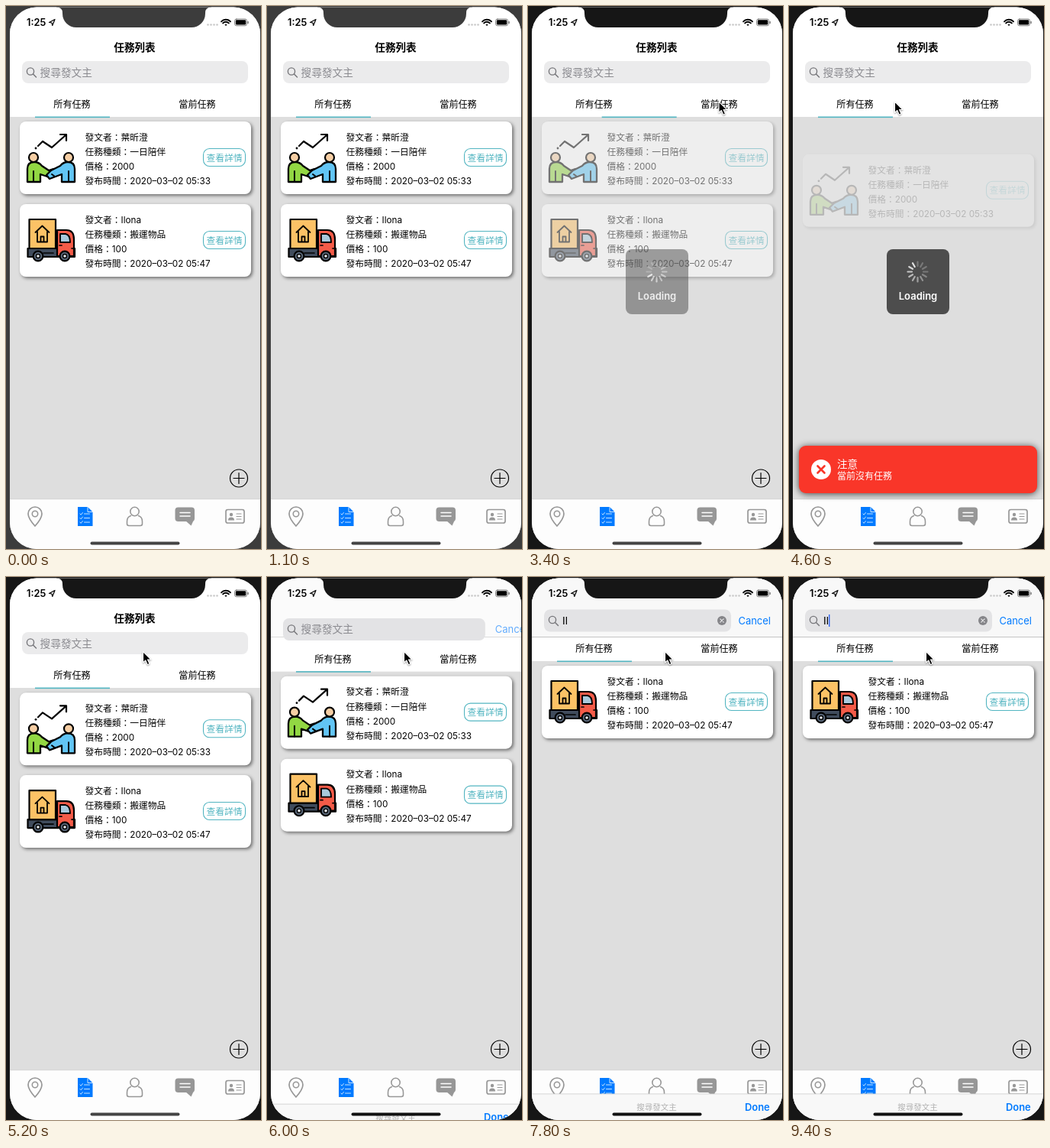
An HTML page with a canvas that plays this animation: 334 px wide and 710 px high, repeating every 9500 ms.

```html
<!DOCTYPE html>
<html lang="zh-Hant">
<head>
<meta charset="utf-8">
<title>任務列表</title>
<style>
html, body { margin: 0; width: 100%; height: 100%; overflow: hidden; background: #161616; }
canvas { display: block; width: 334px; height: 710px; }
</style>
</head>
<body>
<canvas id="stage"></canvas>
<script>
const W = 334, H = 710, LOOP = 9500;
const FAMILY = 'Inter, "Noto Sans CJK TC", "Noto Sans CJK", sans-serif';
const TEAL = '#52b5c1', BLUE = '#007aff', GRAY = '#979797', RED = '#f93629';
const dpr = window.devicePixelRatio || 1;

function prepare(canvas) {
  canvas.width = W * dpr;
  canvas.height = H * dpr;
  return canvas.getContext('2d');
}

const stage = prepare(document.getElementById('stage'));
const buffer = prepare(document.createElement('canvas'));
let ctx = stage;

const TASKS = [
  { who: '葉昕澄', kind: '一日陪伴', price: '2000', time: '05:33', icon: drawHandshake },
  { who: 'Ilona', kind: '搬運物品', price: '100', time: '05:47', icon: drawTruck }
];

// Cursor stops: time, x, y
const CURSOR = [
  [1700, 317, 89], [2000, 232, 116], [2200, 232, 118], [2600, 169, 360], [2800, 169, 360],
  [3200, 250, 125], [3900, 250, 125], [4200, 138.5, 125], [4700, 138.5, 125], [5100, 179.5, 97.5]
];

const clamp = v => Math.max(0, Math.min(1, v));
const lerp = (a, b, p) => a + (b - a) * p;
const smooth = p => p * p * (3 - 2 * p);
const ramp = (t, start, end) => smooth(clamp((t - start) / (end - start)));
const pulse = (t, a, b, c, d) => ramp(t, a, b) * (1 - ramp(t, c, d));

function text(str, x, y, size, color = '#000', weight = 400, align = 'left') {
  ctx.font = `${weight} ${size}px ${FAMILY}`;
  ctx.textAlign = align;
  ctx.fillStyle = color;
  ctx.fillText(str, x, y);
}

function rect(x, y, w, h, fill) {
  ctx.fillStyle = fill;
  ctx.fillRect(x, y, w, h);
}

function box(x, y, w, h, r, fill, stroke, width = 1) {
  ctx.beginPath();
  ctx.roundRect(x, y, w, h, r);
  paint(fill, stroke, width);
}

function circle(x, y, r, fill, stroke, width = 1) {
  ctx.beginPath();
  ctx.arc(x, y, r, 0, Math.PI * 2);
  paint(fill, stroke, width);
}

function paint(fill, stroke, width) {
  if (fill) { ctx.fillStyle = fill; ctx.fill(); }
  if (stroke) { ctx.strokeStyle = stroke; ctx.lineWidth = width; ctx.stroke(); }
}

function shape(d, fill, stroke, width = 1) {
  const path = new Path2D(d);
  if (fill) { ctx.fillStyle = fill; ctx.fill(path); }
  if (stroke) { ctx.strokeStyle = stroke; ctx.lineWidth = width; ctx.stroke(path); }
}

function resetContext(target) {
  target.setTransform(dpr, 0, 0, dpr, 0, 0);
  target.lineCap = target.lineJoin = 'round';
}

// Draws a shifted group; a translucent group is flattened before blending.
function layer(alpha, dx, dy, draw) {
  if (alpha <= 0) return;
  const flatten = alpha < 1;
  if (flatten) {
    ctx = buffer;
    resetContext(ctx);
    ctx.clearRect(0, 0, W, H);
  }
  ctx.save();
  ctx.translate(dx, dy);
  draw();
  ctx.restore();
  if (flatten) {
    ctx = stage;
    ctx.globalAlpha = alpha;
    ctx.drawImage(buffer.canvas, 0, 0, W, H);
    ctx.globalAlpha = 1;
  }
}

function shadow(color, blur, dx, dy) {
  ctx.shadowColor = color;
  ctx.shadowBlur = blur * dpr;
  ctx.shadowOffsetX = dx * dpr;
  ctx.shadowOffsetY = dy * dpr;
}

function drawHandshake() {
  circle(39, 35, 1.4, '#000');
  shape('M42 32L48 26L60 34L78 18M71 17H79V25', null, '#000', 2.2);
  shape('M28 79V62Q28 53 37 53Q43 53 47 58L56 64L62 62L65 66L57 73L45 69V79Z', '#92d743', '#000', 2.3);
  shape('M90 79V62Q90 53 81 53Q75 53 71 58L59 64L53 70L57 75L73 69V79Z', '#62c5f5', '#000', 2.3);
  shape('M36 65V79M82 65V79M60 69L64 72', null, '#000', 2);
  circle(36, 47, 6, '#f7cfa5', '#000', 2.2);
  circle(82, 47, 6, '#f7cfa5', '#000', 2.2);
}

function drawTruck() {
  shape('M28.5 58H90V69H28.5Z', '#404c5d', '#000', 2.2);
  shape('M30.5 20H65V58H30.5Z', '#fcc266', '#000', 2.2);
  shape('M67 34H79Q89 34 89 46V68H67Z', '#f45b48', '#000', 2.2);
  shape('M71 39H78Q84 40 84 50H71Z', '#a9c9dc', '#000', 1.9);
  shape('M38.5 37L47.5 28.5L56.5 37M41 36V49.5H54V36M45.5 49V42.5H49.5V49', null, '#000', 1.8);
  shape('M70 54H73M86 58H89M49 64H62', null, '#000', 1.7);
  for (const x of [42, 77]) {
    circle(x, 68, 6.4, '#596779', '#000', 2.2);
    circle(x, 68, 2.5, '#e5eaee', '#000', 1.4);
  }
}

function drawCard(task, top, alpha = 1) {
  layer(alpha, 0, top, () => {
    ctx.save();
    shadow('rgba(0,0,0,.5)', 4, 2, 2);
    box(18, 0, 303, 95, 8, '#fff');
    ctx.restore();
    task.icon();
    [
      `發文者：${task.who}`, `任務種類：${task.kind}`,
      `價格：${task.price}`, `發布時間：2020–03–02 ${task.time}`
    ].forEach((line, i) => text(line, 103.5, 24.8 + i * 19.1, 11.75));
    box(258.5, 35.5, 55, 23, 8, null, TEAL, 1.1);
    text('查看詳情', 286, 51.6, 11.8, TEAL, 400, 'center');
  });
}

// Springs into place from 50 px below its slot.
function drawEnteringCard(task, top, elapsed) {
  if (elapsed <= 0) return;
  const s = elapsed / 1000;
  const offset = 50 * Math.exp(-8 * s) * (Math.cos(10 * s) + 0.8 * Math.sin(10 * s));
  drawCard(task, top + offset, clamp(s * 3.6));
}

function drawList(t, top) {
  if (t >= 6585) {
    drawEnteringCard(TASKS[1], top, t - 6585);
  } else if (t >= 4300) {
    TASKS.forEach((task, i) => drawEnteringCard(task, top + i * 108, t - 4553 - i * 100));
  } else {
    const alpha = 1 - ramp(t, 3350, 3450);
    TASKS.forEach((task, i) => drawCard(task, top + i * 108, alpha));
  }
  circle(305, 617.5, 11.5, null, '#000', 1.2);
  shape('M298 617.5H312M305 610.5V624.5', null, '#000', 1.2);
}

function drawHeader(t, p, bottom) {
  rect(0, 0, W, bottom, '#fff');
  layer(p, 0, 0, () => {
    rect(0, 0, W, 78, '#f8f8f8');
    rect(0, 78, W, 1, '#c4c4c4');
  });
  layer(1 - clamp(p * 2), 0, -20 * p, () => text('任務列表', 168.5, 59, 13.6, '#000', 600, 'center'));

  const mid = lerp(86.5, 57, p);
  box(21, mid - 14.5, lerp(296, 245, p), 29, 8, p > 0.5 ? '#e3e3e5' : '#ebebec');
  circle(32, mid - 1, 4.6, null, '#77777b', 1.4);
  shape(`M35.5 ${mid + 2.5}L39.5 ${mid + 6.5}`, null, '#77777b', 1.5);

  const typed = t < 6550 ? '' : TASKS[1].who.slice(0, t < 7300 ? 1 : 2);
  if (typed) {
    text(typed, 45, mid + 5, 13.7);
    circle(254, mid, 6, '#858589');
    shape(`M251.8 ${mid - 2.2}l4.4 4.4m0 -4.4l-4.4 4.4`, null, '#e9e9eb', 1.2);
  } else {
    text('搜尋發文主', 44.5, mid + 5, 13.7, '#8b8b90');
  }
  const blink = (t % 1000) >= 200 && (t % 1000) < 700;
  if (t > 5950 && (blink || (t > 6550 && t < 7000))) {
    ctx.font = `400 13.7px ${FAMILY}`;
    rect(45 + ctx.measureText(typed).width, mid - 8, 1.5, 16, '#3a6cf0');
  }
  layer(p, 60 * (1 - p), 0, () => text('Cancel', 275.5, mid + 4.8, 12.9, BLUE));

  const tabY = lerp(133.3, 98.3, p);
  text('所有任務', 86.5, tabY, 12.1, '#000', 500, 'center');
  text('當前任務', 250.5, tabY, 12.1, '#000', 500, 'center');
  const slide = pulse(t, 3300, 3550, 4250, 4500);
  rect(38 + 164 * slide, bottom - 0.5, 98, 1.6, TEAL);
}

function drawStatus(shell) {
  shape('M66 0V1.5Q74 1.5 74 9V10A18 18 0 0 0 92 28H243A18 18 0 0 0 261 10V9Q261 1.5 269 1.5V0Z', shell);
  text('1:25', 27, 26, 12.8, '#000', 600);
  shape('M56.5 21.5L64 17.5L60.8 25.5L60 22Z', null, '#000', 1.2);
  for (let i = 0; i < 4; i++) circle(264.5 + i * 4, 24.5, 1.3, '#c8c8c8');
  for (const r of [2.2, 5.2, 8.2]) {
    ctx.beginPath();
    ctx.arc(288, 26, r, -Math.PI * 0.76, -Math.PI * 0.24);
    if (r < 3) { ctx.lineTo(288, 26); paint('#000'); }
    else paint(null, '#000', 1.9);
  }
  box(299.5, 17, 16, 8.8, 2.4, null, '#777', 0.9);
  box(300.8, 18.3, 13.4, 6.2, 1.3, '#000');
  rect(316.5, 20, 1.3, 3, '#777');
}

function drawTabBar() {
  rect(0, 645, W, 65, '#fdfdfd');
  rect(0, 644.5, W, 0.7, '#cfcfcf');

  shape('M38 680Q29 670 29 664A9 9 0 0 1 47 664Q47 670 38 680Z', null, GRAY, 1.7);
  circle(38, 664, 3.7, null, GRAY, 1.6);

  shape('M94 655H107L113.5 661.5V680H94Z', BLUE);
  shape('M107 655V661.5H113.5', null, '#fff', 0.8);
  for (const y of [664, 669.5, 675]) {
    shape(`M97 ${y}l1.2 1.3l2.2 -2.8M102.5 ${y}H109.5`, null, '#fff', 0.8);
  }

  circle(168.5, 661, 5.7, null, GRAY, 1.6);
  shape('M163.5 666.5Q158.5 668 158.5 674V677Q158.5 679.5 161 679.5H176Q178.5 679.5 178.5 677V674Q178.5 668 173.5 666.5', null, GRAY, 1.6);

  box(221.5, 655.5, 25.5, 18.5, 4, GRAY);
  shape('M235 673H245.5L242.5 679.5Z', GRAY);
  shape('M228 662.5H241M228 667H241', null, '#fff', 1.5);

  box(288, 658.5, 24, 17.5, 2.5, null, GRAY, 1.7);
  circle(295, 665, 2.2, GRAY);
  shape('M291 672.5Q291 668.5 295 668.5T299 672.5Z', GRAY);
  shape('M302 664H308M302 667.5H308M302 671H308', null, GRAY, 1.2);
}

function drawLoading(t) {
  const alpha = Math.max(pulse(t, 3350, 3450, 3750, 3900), pulse(t, 4300, 4400, 4650, 4800));
  layer(alpha, 0, 0, () => {
    box(128, 318, 82, 85, 8, '#4d4d4d');
    const step = Math.floor(t / 83.34);
    for (let i = 0; i < 12; i++) {
      const angle = i * Math.PI / 6 - Math.PI / 2;
      const age = (step - i + 16) % 12;
      const shade = 225 - Math.min(age, 8) * 13;
      const c = Math.cos(angle), s = Math.sin(angle);
      shape(`M${168.5 + c * 7.5} ${347.5 + s * 7.5}L${168.5 + c * 13} ${347.5 + s * 13}`,
        null, `rgb(${shade},${shade},${shade})`, 2.2);
    }
    text('Loading', 169, 383.8, 13, '#fff', 600, 'center');
  });
}

function drawAlert(t) {
  const p = pulse(t, 3700, 3950, 4800, 5080);
  layer(p, 0, 70 * (1 - p), () => {
    ctx.save();
    shadow('rgba(0,0,0,.7)', 10, 0, 1);
    box(13, 575, 312, 62, 9, RED);
    ctx.restore();
    circle(42, 606, 13, '#fff');
    shape('M37.5 601.5L46.5 610.5M46.5 601.5L37.5 610.5', null, RED, 2.6);
    text('注意', 63, 604, 13.5, '#fff', 500);
    text('當前沒有任務', 63, 619.3, 12, '#fff');
  });
}

function drawToolbar(p) {
  layer(p > 0 ? 1 : 0, 0, 34 * (1 - p), () => {
    rect(0, 676, W, 34, '#f8f8f8');
    rect(0, 675.5, W, 0.8, '#cdcdcd');
    text('搜尋發文主', 168.5, 697.3, 10.5, '#b2b2b2', 400, 'center');
    text('Done', 284, 698, 12.9, BLUE, 600);
  });
}

function drawCursor(t) {
  if (t < CURSOR[0][0]) return;
  let next = CURSOR.findIndex(stop => stop[0] > t);
  if (next < 0) next = CURSOR.length - 1;
  const [t0, x0, y0] = CURSOR[next - 1], [t1, x1, y1] = CURSOR[next];
  const p = ramp(t, t0, t1);
  layer(1, lerp(x0, x1, p), lerp(y0, y1, p), () => {
    shadow('rgba(0,0,0,.3)', 2, 0, 1);
    shape('M0 0V14.5L3.3 11.5L5.8 17.3L8.5 16.1L6 10.5H10.5Z', '#000', '#fff', 1.1);
  });
}

function draw(t) {
  resetContext(ctx);
  const tone = Math.round(lerp(60, 22, ramp(t, 2650, 2950)));
  const shell = `rgb(${tone},${tone},${tone})`;
  rect(0, 0, W, H, shell);

  const search = ramp(t, 5800, 6150);
  const bottom = lerp(145, 110, search);
  ctx.save();
  ctx.beginPath();
  ctx.roundRect(5, 1.5, 328, 708.5, 35);
  ctx.clip();
  rect(0, 0, W, H, '#dedede');
  drawList(t, bottom + 6);
  drawHeader(t, search, bottom);
  drawStatus(shell);
  drawTabBar();
  drawToolbar(search);
  drawAlert(t);
  drawLoading(t);
  box(110.5, 700.5, 117, 4, 2, search > 0.5 ? '#111' : '#444');
  ctx.restore();
  drawCursor(t);
}

function tick() {
  draw(performance.now() % LOOP);
  requestAnimationFrame(tick);
}
tick();
</script>
</body>
</html>
```
